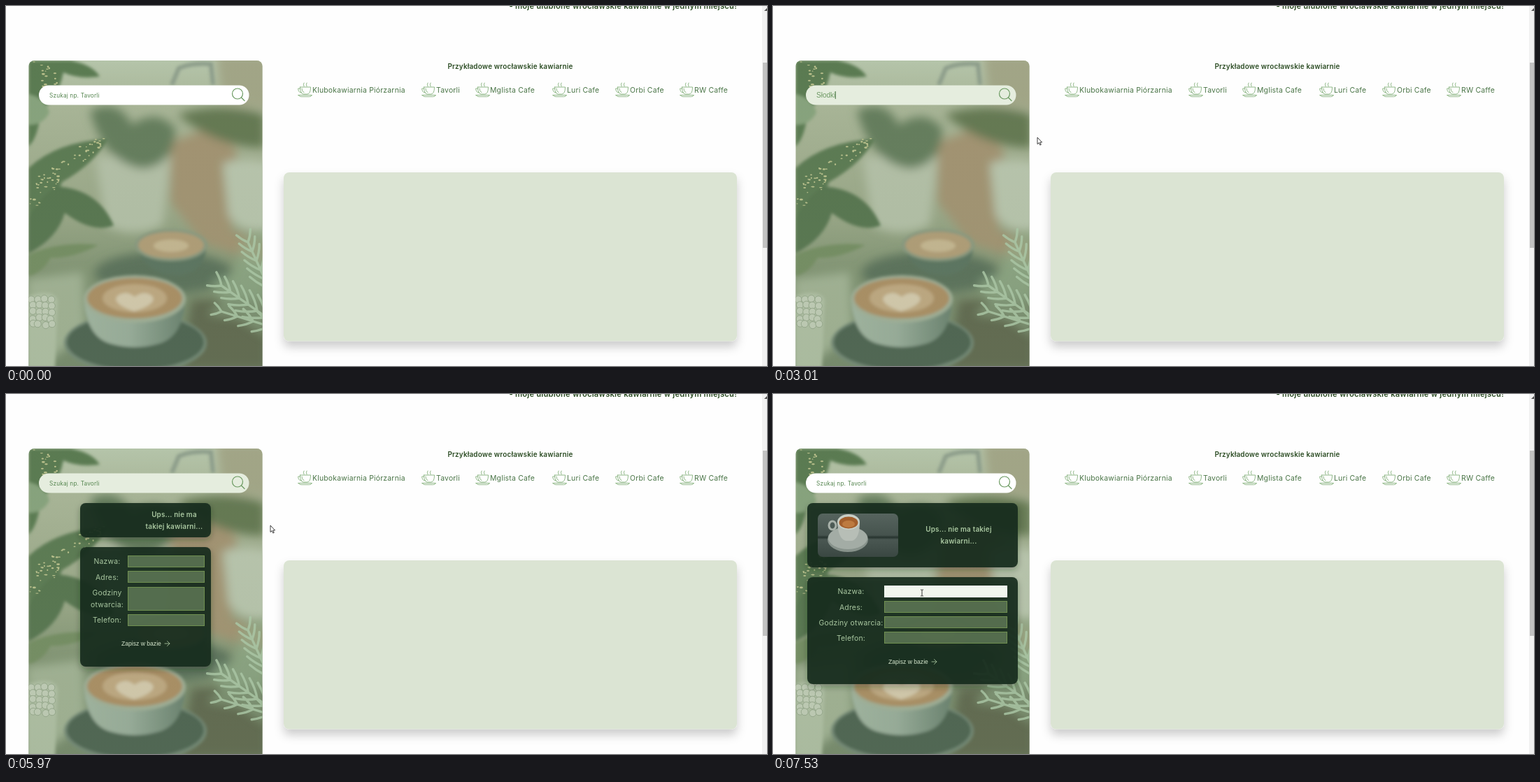
An HTML page for the animation above (8 s loop, 1088 by 515 pixels).

```html
<!DOCTYPE html>
<html lang="pl">
<head>
<meta charset="utf-8">
<title>Kawiarnie</title>
<style>
html, body { margin: 0; width: 100%; height: 100%; overflow: hidden; background: #fefefe; }
svg { display: block; width: 100%; height: 100%; }
text { font-family: Inter, "Open Sans", sans-serif; font-size: 10.4px; letter-spacing: .02em; fill: #4a7547; white-space: pre; }
.head { font-weight: 600; fill: #2a4b22; }
.mid { text-anchor: middle; }
.card text { fill: #a9c7a0; }
.card .bold { font-weight: 600; font-size: 9.9px; }
text.plain { font-family: "Liberation Sans", Arial, sans-serif; letter-spacing: 0; }
.card text.save { font-size: 8.6px; fill: #d5e5cc; }
.line { fill: none; stroke: #7fad75; stroke-width: .85; stroke-linecap: round; stroke-linejoin: round; }
.field { fill: #8fac7c; fill-opacity: .48; stroke: #6f8f50; }
</style>
</head>
<body>
<svg viewBox="0 0 1088 515" preserveAspectRatio="none">
  <defs>
    <clipPath id="frame"><rect x="32.5" y="78" width="334" height="460" rx="8"/></clipPath>
    <clipPath id="thumb"><rect x="64" y="171" width="115" height="62" rx="7"/></clipPath>
    <linearGradient id="base" x2="0" y2="1">
      <stop stop-color="#b6c5ab"/><stop offset=".15" stop-color="#a9b497"/>
      <stop offset=".5" stop-color="#9aa587"/><stop offset=".7" stop-color="#7f8f70"/><stop offset="1" stop-color="#748468"/>
    </linearGradient>
    <linearGradient id="tint" x2="0" y2="1">
      <stop stop-color="#8fb58a" stop-opacity=".04"/><stop offset="1" stop-color="#7fa57c" stop-opacity=".18"/>
    </linearGradient>
    <linearGradient id="cup"><stop stop-color="#a3b3a2"/><stop offset=".45" stop-color="#9aab9c"/><stop offset="1" stop-color="#657a6b"/></linearGradient>
    <linearGradient id="wood" x2="0" y2="1"><stop stop-color="#56645e"/><stop offset=".5" stop-color="#46534e"/><stop offset=".55" stop-color="#26332e"/><stop offset=".6" stop-color="#4a5752"/><stop offset="1" stop-color="#3a4742"/></linearGradient>
    <filter id="soft" x="-30%" y="-30%" width="160%" height="160%"><feGaussianBlur stdDeviation="7"/></filter>
    <filter id="mild" x="-30%" y="-30%" width="160%" height="160%"><feGaussianBlur stdDeviation="2"/></filter>
    <filter id="drop" x="-20%" y="-20%" width="140%" height="150%"><feDropShadow dx="0" dy="8" stdDeviation="7" flood-opacity=".2"/></filter>
    <filter id="glow" x="-20%" y="-20%" width="140%" height="150%"><feDropShadow dx="0" dy="4" stdDeviation="5" flood-color="#14261a" flood-opacity=".35"/></filter>
  </defs>

  <text class="head" x="1045" y="3.5" text-anchor="end" style="font-size:11.2px">- moje ulubione wrocławskie kawiarnie w jednym miejscu!</text>
  <text class="head mid" x="721" y="90" style="font-size:9.9px">Przykładowe wrocławskie kawiarnie</text>
  <g id="list"></g>
  <rect x="397" y="238" width="648" height="241.5" rx="8" fill="#dbe4d3" filter="url(#drop)"/>

  <rect x="1081" width="7" height="515" fill="#f1f1f1"/>
  <rect x="1082" y="81" width="6" height="265" fill="#c1c1c1"/>
  <path d="M1084 7l4-4v4z" fill="#505050"/>

  <g clip-path="url(#frame)">
    <rect x="32" y="78" width="335" height="438" fill="url(#base)"/>
    <g filter="url(#soft)">
      <path d="M300 70h80v80l-70-10z" fill="#a2a486"/>
      <path d="M235 195l70-25 25 40-8 110 50 20v30l-90-30-47-60z" fill="#a3906f"/>
      <path d="M265 420h110v100H250z" fill="#5c6149"/>
      <path d="M128 215h108l-12 98q-44 22-82 0z" fill="#b5bfa8"/>
      <path d="M120 150q40-20 60 20 35-25 62 5 0 52-46 58-56-8-76-83z" fill="#62795a"/>
      <path d="M245 155q60-20 125 0v48q-70 0-125-48z" fill="#62754f"/>
      <path d="M310 225q30-10 70 0v95q-40 10-62-20z" fill="#bac4ae"/>
      <path d="M30 390l80-10 5 90-75 50H30z" fill="#a3b094"/>
      <ellipse cx="225" cy="382" rx="98" ry="30" fill="#566a56"/>
    </g>
    <g filter="url(#mild)">
      <path d="M237 113l10-24q18-8 46-6l3 30" fill="none" stroke="#8c9b8a" stroke-width="6"/>
      <path d="M186 342h101q-3 40-40 44-48 0-61-44z" fill="#566d5c"/>
      <ellipse cx="236" cy="342" rx="52" ry="23" fill="#87957f"/>
      <ellipse cx="236" cy="342" rx="47" ry="19" fill="#b39a74"/>
      <ellipse cx="236" cy="343" rx="25" ry="9" fill="#c9b591"/>
      <ellipse cx="185" cy="482" rx="102" ry="43" fill="#728474"/>
      <ellipse cx="185" cy="481" rx="98" ry="39" fill="#465a4b"/>
      <path d="M111 418h146q-4 58-42 66-31 8-62 0-38-8-42-66z" fill="url(#cup)"/>
      <ellipse cx="184" cy="419" rx="73" ry="34" fill="#a3ae99"/>
      <ellipse cx="184" cy="418" rx="68" ry="29" fill="#ae8a60"/>
      <ellipse cx="184" cy="418" rx="46" ry="20" fill="#c4a680"/>
      <path d="M183 437q-34-12-23-23 12-8 24 2 14-10 25-1 8 11-26 22z" fill="#dccbb0"/>
    </g>
    <g filter="url(#mild)">
      <path d="M32 78h60q32 6 42 23-32 4-52-6-8 40-32 54-4 40-18 52z" fill="#587850"/>
      <path d="M32 126q24 6 30 26-8 18-30 18z" fill="#86a17b"/>
      <path d="M32 232q40-38 114-42-20 36-66 62-12 40-48 66z" fill="#587650"/>
      <path d="M72 258q60 4 82 56-30 12-70-18-10 36-52 58v-50q16-30 40-46z" fill="#52704c"/>
      <path d="M32 356q45-20 100-14-38 20-68 18-12 22-32 26z" fill="#72895f"/>
    </g>
    <g id="dots" fill="#bcc08c"></g>
    <path d="M32 415q35-12 42 6l-4 97H32z" fill="#b3bfa6" filter="url(#mild)"/>
    <g id="stones" fill="#c6cebb" stroke="#93a288" stroke-width=".9"></g>
    <path d="M372 322l-34 10-12 48-34 12 16 30-22 20 46 6 40 26z" fill="#93ae8c" opacity=".55" filter="url(#soft)"/>
    <path id="herb" fill="none" stroke="#b0c9aa" stroke-width="3.4" stroke-linecap="round" opacity=".85"/>
    <rect x="32" y="78" width="335" height="438" fill="url(#tint)"/>
    <g id="narrow" class="card"></g>
    <g id="wide" class="card"></g>
  </g>

  <rect id="bar" x="47" y="113.5" width="300.5" height="28" rx="14" fill="#fff"/>
  <g class="line" style="stroke:#6b9a61;stroke-width:1.2"><circle cx="331" cy="125.5" r="7.5"/><path d="M336.5 131l4.5 4.5"/></g>
  <text id="hint" x="62" y="131" style="font-size:8.25px;fill:#568650">Szukaj np. Tavorli</text>
  <text id="typed" class="plain" x="62" y="131" style="font-size:10px;fill:#6c9862"></text>
  <rect id="caret" y="122" width="1" height="11" fill="#467342"/>
  <g id="mouse">
    <path id="arrow" d="M0 0v9.6l2.2-2 1.6 3.4 1.5-.7-1.6-3.3h2.9z" fill="#fff" stroke="#111" stroke-width=".8"/>
    <path id="beam" d="M-2-4.5h1.5L0-4l.5-.5H2M0-4v8M-2 4.5h1.5L0 4l.5.5H2" fill="none" stroke="#222" stroke-width=".9"/>
  </g>
</svg>
<script>
const $ = id => document.getElementById(id);
const clamp = v => Math.min(1, Math.max(0, v));
const mix = (a, b, k) => a + (b - a) * k;
const smooth = k => k * k * (3 - 2 * k);
const within = (t, spans) => spans.some(([a, b]) => t >= a && t < b);
const show = (id, on) => $(id).style.display = on ? '' : 'none';

// Progress from a to b, held for one screen refresh (1/13 s) at a time
const beat = 1000 / 13;
const ramp = (t, a, b) => clamp(Math.floor((t - a) / beat + .08) / Math.round((b - a) / beat));

let seed = 7;
const rnd = () => (seed = seed * 16807 % 2147483647) / 2147483647;

// Café list
const cafes = [[438, 'Klubokawiarnia Piórzarnia'], [615, 'Tavorli'], [692, 'Mglista Cafe'],
  [802, 'Luri Cafe'], [892, 'Orbi Cafe'], [984, 'RW Caffe']];
$('list').innerHTML = cafes.map(([x, name]) => `
  <path class="line" transform="translate(${x - 21} 110)" d="M3.5 6h15q0 10-5 10h-5q-5 0-5-10M3.7 8H.7q0 6 5 6M6 8q.4 5 3 5.5M9 0q-1.5 2 0 5M13 0q-1.5 2 0 5M1 17.5h19.5q-1 2.2-4 2.2H5q-3 0-4-2.2z"/>
  <text x="${x}" y="123.5">${name}</text>`).join('');

// Speckles, pebbles and rosemary
function speckle(n, cx, cy, len, wide, angle) {
  let out = '';
  for (let i = 0; i < n; i++) {
    const u = rnd() * 2 - 1, v = (rnd() * 2 - 1) * Math.sqrt(1 - u * u);
    const x = cx + u * len * Math.cos(angle) - v * wide * Math.sin(angle);
    const y = cy + u * len * Math.sin(angle) + v * wide * Math.cos(angle);
    out += `<ellipse cx="${x}" cy="${y}" rx="${.9 + rnd() * 1.6}" ry="${.6 + rnd() * .8}"/>`;
  }
  return out;
}
$('dots').innerHTML = speckle(34, 92, 222, 58, 12, -.58) + speckle(28, 55, 262, 34, 14, -1) + speckle(24, 55, 100, 25, 15, .9);
for (let i = 0; i < 20; i++)
  $('stones').innerHTML += `<circle cx="${36 + i % 4 * 9 + rnd() * 3}" cy="${418 + (i >> 2) * 9 + rnd() * 3}" r="5"/>`;

function sprig(x0, y0, x1, y1, n, len) {
  const a = Math.atan2(y1 - y0, x1 - x0);
  let d = `M${x0} ${y0}L${x1} ${y1}`;
  for (let i = 0; i < n; i++) {
    const k = i / (n - 1), x = mix(x0, x1, k), y = mix(y0, y1, k), l = len * (1 - k * .4);
    for (const s of [-.6, .6])
      d += `M${x} ${y}q${l / 2 * Math.cos(a + s * 1.3)} ${l / 2 * Math.sin(a + s * 1.3)} ${l * Math.cos(a + s)} ${l * Math.sin(a + s)}`;
  }
  return d;
}
$('herb').setAttribute('d', sprig(372, 445, 308, 400, 6, 34) + sprig(376, 404, 346, 338, 6, 32) + sprig(376, 458, 308, 437, 4, 26));

// Message and form cards
const rect = (x, y, w, h, extra) => `<rect x="${x}" y="${y}" width="${w}" height="${h}" ${extra}/>`;
const label = (x, y, s, c = '') => `<text class="mid ${c}" x="${x}" y="${y}">${s}</text>`;
function card(c) {
  const panel = (y, h) => rect(c.x, y, c.w, h, 'rx="8" fill="#192d20" fill-opacity=".92" filter="url(#glow)"');
  return panel(156, c.h1) + panel(c.y2, c.h2)
    + c.msg.map((s, i) => label(c.msgX, c.msgY + i * 17, s, 'bold')).join('')
    + c.labels.map(([s, y]) => label(c.labelX, y, s)).join('')
    + c.fields.map(([y, h]) => rect(c.fieldX + .5, y + .5, c.fieldW - 1, h - 1, 'class="field"')).join('')
    + `<text class="plain save" x="165" y="${c.saveY}">Zapisz w bazie</text>
       <path class="line" style="stroke:#a9c7a0" d="M227 ${c.saveY - 3}h7m-3.5-3.5l3.5 3.5-3.5 3.5"/>`;
}
$('narrow').innerHTML = card({
  x: 106, w: 187, h1: 49, y2: 219, h2: 171,
  msg: ['Ups... nie ma', 'takiej kawiarni...'], msgX: 240.5, msgY: 176,
  labels: [['Nazwa:', 243], ['Adres:', 265.5], ['Godziny', 288], ['otwarcia:', 305], ['Telefon:', 327]], labelX: 144.5,
  fields: [[231, 17], [253, 17], [276, 34], [315, 17]], fieldX: 174, fieldW: 110, saveY: 360
});
$('wide').innerHTML = card({
  x: 49, w: 301, h1: 92, y2: 262, h2: 153,
  msg: ['Ups... nie ma takiej', 'kawiarni...'], msgX: 265.5, msgY: 197,
  labels: [['Nazwa:', 286], ['Adres:', 308.5], ['Godziny otwarcia:', 331], ['Telefon:', 352.5]], labelX: 111.5,
  fields: [[274, 17], [296, 17], [318, 17], [340, 17]], fieldX: 159, fieldW: 176, saveY: 386
}) + `<g clip-path="url(#thumb)">
  <rect x="64" y="171" width="115" height="62" fill="url(#wood)"/>
  <ellipse cx="107" cy="208" rx="29" ry="18" fill="#87928b"/><ellipse cx="107" cy="206" rx="28" ry="16" fill="#a3aca5"/>
  <ellipse cx="85" cy="188" rx="5" ry="6" fill="none" stroke="#a9b2aa" stroke-width="3"/>
  <path d="M92 183h32q0 24-11 27h-9q-11-3-12-27z" fill="#b7beb6"/>
  <ellipse cx="108" cy="183" rx="16" ry="11" fill="#c9cfc6"/><ellipse cx="108" cy="184" rx="13.5" ry="8.5" fill="#a35f2c"/>
  <ellipse cx="108" cy="186" rx="9" ry="5" fill="#bd7a3f"/></g>`;
const nameField = $('wide').querySelector('.field');
nameField.insertAdjacentHTML('afterend', rect(159, 274, 176, 17, 'id="focus" fill="#f1f6ee"'));

// Typing and pointer
const phrase = 'Słodki baranek';
const keys = [1850, 2380, 2630, 2780, 2930, 3010, 3250, 3480, 3790, 4200, 4420, 4490, 4660, 4810];
const moves = [[70, 530, 238, 129], [760, 1150, 378, 188], [6060, 6760, 213, 284.5]];

function draw(t) {
  const typed = t < 5040 ? phrase.slice(0, keys.filter(k => t >= k).length) : '';
  $('typed').textContent = typed;
  show('hint', !typed);

  const inName = t >= 6990;
  $('caret').setAttribute('x', inName ? 167 : 61.5 + (typed ? $('typed').getComputedTextLength() : 0));
  $('caret').setAttribute('y', inName ? 277 : 122);
  show('caret', within(t, [[760, 1300], [1850, 5590], [6120, 6650], [6990, 7530]]));

  const left = ramp(t, 6910, 7220), held = ramp(t, 690, 1000) - left;
  $('bar').setAttribute('fill', `rgb(${mix(255, 229, held)} ${mix(255, 237, held)} ${mix(255, 222, held)})`);
  $('focus').setAttribute('opacity', left);
  show('narrow', within(t, [[5970, 6060]]));
  show('wide', t >= 6060);

  let x = 857, y = 441;
  for (const [a, b, tx, ty] of moves) {
    const k = smooth(ramp(t, a, b));
    x = mix(x, tx, k);
    y = mix(y, ty, k);
  }
  const overBar = x > 47 && x < 347 && y > 114 && y < 141;
  const overName = t > 6060 && x > 159 && x < 335 && y > 274 && y < 291;
  $('mouse').setAttribute('transform', `translate(${x} ${y})`);
  show('mouse', t >= 70);
  show('beam', overBar || overName);
  show('arrow', !(overBar || overName));
}

function tick() {
  draw(performance.now() % 8000);
  requestAnimationFrame(tick);
}
tick();
</script>
</body>
</html>
```
